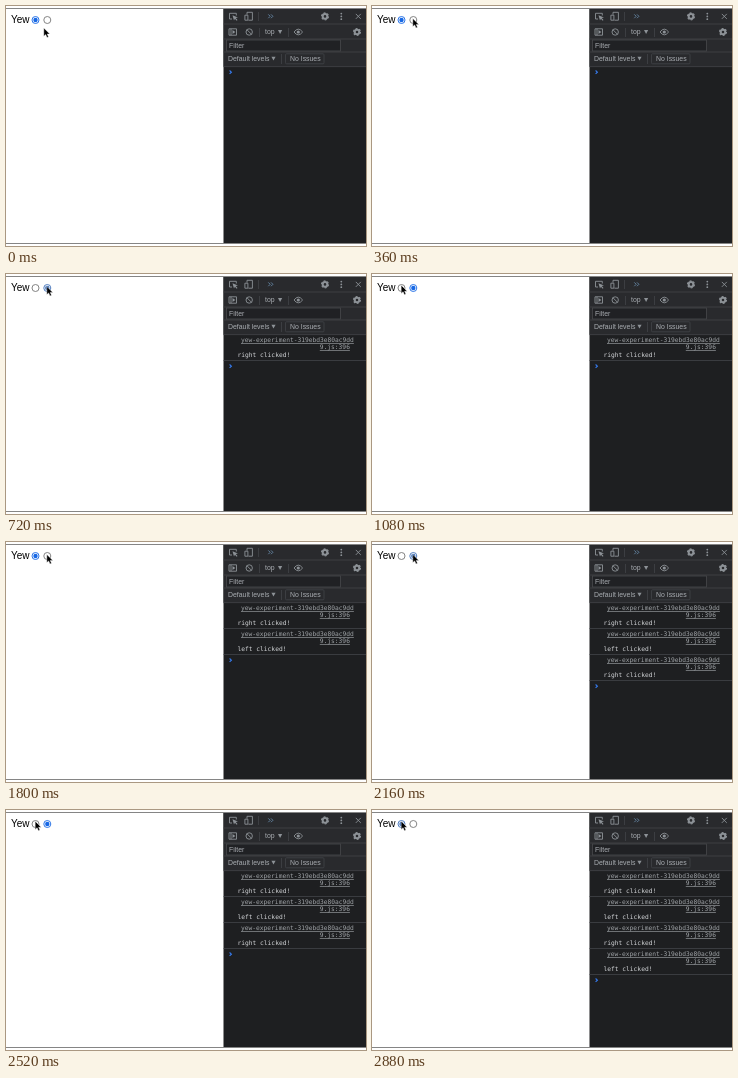
An HTML page that plays this animation: 360x240 px, repeating every 3.24 s.

```html
<!DOCTYPE html>
<html lang="en">
<head>
<meta charset="utf-8">
<style>
html, body { margin: 0; width: 100%; height: 100%; overflow: hidden; background: #fff; }
svg { display: block; width: 360px; height: 240px; }
text { font-family: "Liberation Sans", Arial, sans-serif; font-size: 6.9px; fill: #a9adb2; white-space: pre; }
.mono text { font-family: "DejaVu Sans Mono", monospace; font-size: 6.25px; fill: #d5d7da; }
.mono .link { fill: #a0a4a8; text-decoration: underline; }
.icon { fill: none; stroke: #8d9297; stroke-width: .9; }
.solid { fill: #8d9297; }
.rule { fill: none; stroke: #424448; stroke-width: .8; }
</style>
</head>
<body>
<svg viewBox="0 0 360 240">
  <defs>
    <g id="gear" fill="none" stroke="#8d9297">
      <circle r="2.3" stroke-width="2"/>
      <circle r="3.5" stroke-width="1.1" stroke-dasharray="1.9 1.765"/>
    </g>
    <path id="down" class="solid" d="M-2.1-1.7H2.1L0 2.1Z"/>
  </defs>

  <rect width="360" height="240" fill="#fff"/>
  <path d="M0 2.5H360M0 237.5H360" stroke="#858585"/>
  <text x="4.9" y="17.4" style="font-size:10px;fill:#000">Yew</text>
  <g id="radios"></g>

  <rect x="217.5" y="3" width="142.5" height="234" fill="#1e1f21"/>
  <rect x="217.5" y="3" width="142.5" height="57.5" fill="#292a2d"/>
  <path class="rule" d="M217.5 18H360M217.5 33H360M217.5 46H360M217.5 60.6H360M252.5 6V15M253.5 22V31M282.5 22V31M275.5 48V58"/>

  <path class="icon" d="M226 13H223.5V7.3H230.3V9.5"/>
  <path class="solid" d="M226.5 9.2L232 11.4 229.7 12.1 231.5 14.1 230.7 14.8 228.9 12.8 228 14.6Z"/>
  <path class="icon" d="M241 8.6V6.3H246.4V14.2H242.4M238.9 9.2H241.9V14.2H238.9Z"/>
  <path class="icon" style="stroke:#6688a8" d="M262.3 8.4L264.2 10.3 262.3 12.2M265 8.4L266.9 10.3 265 12.2"/>
  <use href="#gear" x="319" y="10.4"/>
  <g class="solid">
    <circle cx="335.3" cy="7.6" r=".9"/><circle cx="335.3" cy="10.4" r=".9"/><circle cx="335.3" cy="13.2" r=".9"/>
  </g>
  <path class="icon" d="M349.8 7.9L354.8 12.9M354.8 7.9L349.8 12.9"/>

  <path class="icon" d="M223 22.8H230.5V29.2H223ZM225 22.8V29.2"/>
  <path class="solid" d="M226.5 24L229.4 26 226.5 28Z"/>
  <path class="icon" d="M246.4 26A3.2 3.2 0 1 0 240 26A3.2 3.2 0 1 0 246.4 26M241 23.8L245.5 28.3"/>
  <text x="259" y="28.2">top</text>
  <use href="#down" x="274.1" y="25.8"/>
  <path class="icon" d="M288 26Q292.3 20.3 296.6 26Q292.3 31.7 288 26Z"/>
  <circle class="solid" cx="292.3" cy="26" r="1.6"/>
  <use href="#gear" x="351" y="26"/>

  <rect x="220.5" y="34" width="114" height="11" fill="#202124" stroke="#48494c" stroke-width=".8"/>
  <text x="223" y="42.2">Filter</text>
  <text x="222" y="55.1">Default levels</text>
  <use href="#down" x="267.5" y="52.5"/>
  <rect class="rule" x="279.5" y="47.8" width="38.5" height="10" rx="1"/>
  <text x="284" y="55.1">No Issues</text>

  <g id="logs" class="mono"></g>
  <path id="prompt" fill="none" stroke="#367cf1" stroke-width="1.1" d="M223.6-1.7L225.4 0 223.6 1.7"/>
  <path id="cursor" fill="#000" stroke="#fff" stroke-width=".4" d="M0 0V8.2L1.9 6.5 3.2 9.5 4.7 8.9 3.4 6H6Z"/>
</svg>
<script>
const STEP = 360;
const ROW = 26;
const RADIO_X = [29.5, 41.3];
const LEFT = [29.2, 11.2], RIGHT = [40.8, 12.4];

// Each state: cursor tip, selected radio, number of log entries
const states = [
  [[37.8, 22], 0, 0], [RIGHT, 0, 0], [RIGHT, 1, 1],
  [LEFT, 1, 1], [LEFT, 0, 2], [RIGHT, 0, 2],
  [RIGHT, 1, 3], [LEFT, 1, 3], [LEFT, 0, 4]
];

const el = id => document.getElementById(id);

function radio(x, on, hovered) {
  const color = !on ? "#777" : hovered ? "#3f70b8" : "#1768e5";
  const ring = `<circle cx="${x}" cy="14" r="3.5" fill="#fff" stroke="${color}" stroke-width=".9"/>`;
  return on ? `${ring}<circle cx="${x}" cy="14" r="2.2" fill="${color}"/>` : ring;
}

const log = (_, i) => `<g transform="translate(0 ${i * ROW})">
  <text class="link" x="235" y="68.3">yew-experiment-319ebd3e80ac9dd</text>
  <text class="link" x="313.8" y="75.2">9.js:396</text>
  <text x="231.5" y="83.1">${i % 2 ? "left" : "right"} clicked!</text>
  <path class="rule" d="M217.5 86.5H360"/>
</g>`;

let shown = -1;

function render(time) {
  const index = Math.floor(time / STEP) % states.length;
  if (index === shown) return;
  shown = index;
  const [tip, selected, count] = states[index];
  const target = [LEFT, RIGHT].indexOf(tip);
  el("radios").innerHTML = RADIO_X.map((x, i) => radio(x, i === selected, i === target)).join("");
  el("logs").innerHTML = Array.from({ length: count }, log).join("");
  el("prompt").setAttribute("transform", `translate(0 ${66.2 + count * ROW})`);
  el("cursor").setAttribute("transform", `translate(${tip})`);
}

const start = performance.now();
function tick() {
  render(performance.now() - start);
  requestAnimationFrame(tick);
}
tick();
</script>
</body>
</html>
```
